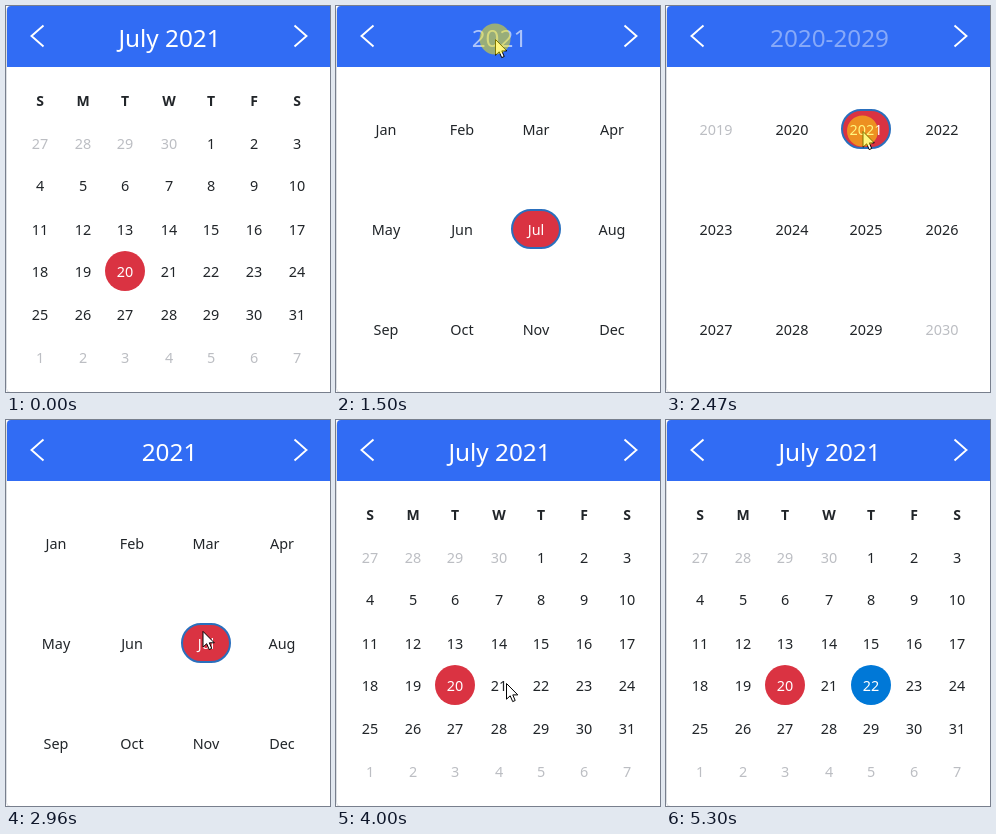
Recreate the animation shown at these times as an HTML page. Size 324 by 386 pixels, loop 5.52 s.

```html
<!DOCTYPE html>
<html lang="en">
<head>
<meta charset="utf-8">
<title>Calendar</title>
<style>
html, body { margin: 0; width: 100%; height: 100%; overflow: hidden; background: #fff; }
svg { display: block; width: 324px; height: 386px; }
text { font: 14.4px "Noto Sans", "Open Sans", sans-serif; fill: #212529; text-anchor: middle; }
text.head { font-weight: 700; font-size: 14px; }
text.mute { fill: #bcbec3; }
text.on { fill: #fff; }
#title { font-size: 24.3px; fill: #fff; }
</style>
</head>
<body>
<svg id="stage" viewBox="0 0 324 386">
  <rect x=".5" y=".5" width="330" height="386" rx="4" fill="#fff" stroke="#dcdfe3"/>
  <path d="M1 61V4Q1 0 5 0H324V61Z" fill="#316cf4"/>
  <path d="M37.5 19.5L25.5 30L37.5 40.5M288.5 19.5L300.5 30L288.5 40.5" fill="none" stroke="#fff" stroke-width="1.9"/>
  <text id="title" x="163.5" y="40.5"></text>
  <g id="days"></g>
  <g id="months"></g>
  <g id="years"></g>
  <path id="cursor" d="M.5 .5V16.2L4.2 12.8L6.7 18.6L9.2 17.5L6.8 11.9H11.8Z" fill="#fff" stroke="#000" stroke-width="1"/>
  <circle id="press" r="15.5" fill="#ffee00"/>
</svg>
<script>
const LOOP = 5520, RED = '#da3342', BLUE = '#0078d7';
const $ = id => document.getElementById(id);

function add(parent, tag, attrs, label) {
  const el = document.createElementNS('http://www.w3.org/2000/svg', tag);
  for (const key in attrs) el.setAttribute(key, attrs[key]);
  if (label !== undefined) el.textContent = label;
  parent.appendChild(el);
  return el;
}

function buildDays() {
  const xs = [34, 77, 119, 163, 205, 248, 291];
  const ys = [143, 185, 228.5, 271, 314, 357];
  const cells = {};
  xs.forEach((x, i) => add($('days'), 'text', { x, y: 99.5, class: 'head' }, 'SMTWTFS'[i]));
  for (let i = 0; i < 42; i++) {
    const x = xs[i % 7], y = ys[Math.floor(i / 7)], day = i - 3;
    const inside = day >= 1 && day <= 31;
    const label = day < 1 ? day + 30 : day > 31 ? day - 31 : day;
    let disc;
    if (inside && day >= 20 && day <= 22) {
      disc = add($('days'), 'circle', { cx: x, cy: 265, r: 20, fill: day === 20 ? RED : BLUE });
    }
    const text = add($('days'), 'text', { x, y, class: inside ? day === 20 ? 'on' : '' : 'mute' }, label);
    if (disc) cells[day] = { disc, text };
  }
  return cells;
}

function buildGrid(id, labels, active, muted) {
  const xs = [50, 126, 200, 276];
  labels.forEach((label, i) => {
    const x = xs[i % 4], y = 129 + 100 * Math.floor(i / 4);
    if (i === active) {
      add($(id), 'rect', { x: x - 24, y: y - 25, width: 48, height: 38, rx: 19, fill: RED, stroke: '#2a6fbd', 'stroke-width': 2 });
    }
    add($(id), 'text', { x, y, class: i === active ? 'on' : muted.includes(i) ? 'mute' : '' }, label);
  });
}

const cells = buildDays();
buildGrid('months', 'Jan Feb Mar Apr May Jun Jul Aug Sep Oct Nov Dec'.split(' '), 6, []);
buildGrid('years', Array.from({ length: 12 }, (_, i) => 2019 + i), 2, [0, 11]);

// time, x, y of the pointer tip
const path = [
  [130, 300, 338], [600, 159, 33],
  [1910, 159, 33], [2440, 196.5, 125],
  [2590, 196.5, 125], [3060, 196.5, 222],
  [3510, 196.5, 222], [3780, 196, 288], [4000, 170, 263],
  [4190, 170, 263], [4470, 224, 271],
  [4610, 224, 271], [4680, 210, 271],
  [4800, 210, 271], [5290, 287, 388]
];
const presses = [700, 1500, 2460, 3100, 4060, 4680];
const views = [[0, 'days'], [840, 'months'], [1640, 'years'], [2540, 'months'], [3180, 'days']];
const titles = { days: 'July 2021', months: '2021', years: '2020-2029' };

const clamp = v => Math.min(1, Math.max(0, v));
const ease = u => u * u * (3 - 2 * u);

function pointer(t) {
  let i = 0;
  while (i < path.length - 2 && t >= path[i + 1][0]) i++;
  const [t0, x0, y0] = path[i], [t1, x1, y1] = path[i + 1];
  const u = ease(clamp((t - t0) / (t1 - t0)));
  return [x0 + (x1 - x0) * u, y0 + (y1 - y0) * u];
}

function pressAlpha(t) {
  const start = presses.filter(p => p <= t).pop();
  return start === undefined ? 0 : 0.5 * clamp((210 - (t - start)) / 70);
}

function select(day, on) {
  cells[day].disc.style.display = on ? '' : 'none';
  cells[day].text.setAttribute('class', on ? 'on' : '');
}

function render(t) {
  const view = views.filter(v => v[0] <= t).pop()[1];
  for (const id in titles) $(id).style.display = id === view ? '' : 'none';

  const [x, y] = pointer(t);
  const hover = t >= 130 && y < 48;
  $('title').textContent = titles[view];
  $('title').setAttribute('fill-opacity', view === 'years' ? 0.42 : hover ? 0.6 : 1);

  select(21, t >= 4140 && t < 4680);
  select(22, t >= 4760);

  $('cursor').style.display = t >= 130 && t < 5290 ? '' : 'none';
  $('cursor').setAttribute('transform', `translate(${x} ${y})`);
  $('press').setAttribute('transform', `translate(${x} ${y})`);
  $('press').setAttribute('opacity', pressAlpha(t));
}

const begin = performance.now();
function tick() {
  render((performance.now() - begin) % LOOP);
  requestAnimationFrame(tick);
}
tick();
</script>
</body>
</html>
```
